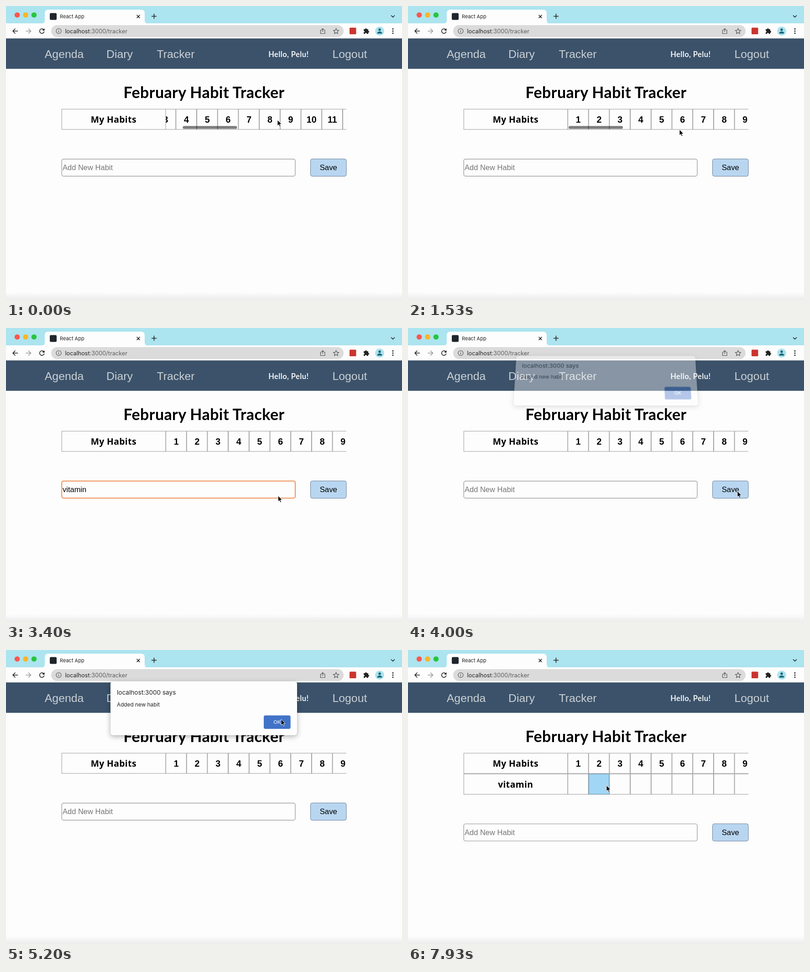
Write an HTML page that moves like this. It is 868 by 645 pixels and loops after 8000 ms.

```html
<!DOCTYPE html>
<html lang="en">
<head>
<meta charset="utf-8">
<title>Habit tracker</title>
<style>
  html, body { margin: 0; width: 100%; height: 100%; overflow: hidden; background: #fdfdfd; }
  #stage { position: absolute; left: 0; top: 0; width: 868px; height: 645px; overflow: hidden; }
  svg { position: absolute; left: 0; top: 0; display: block; }
  .ui { font-family: Inter, Roboto, sans-serif; }
  .arial { font-family: "Liberation Sans", Arial, sans-serif; }
  .lato { font-family: Lato, sans-serif; font-weight: 700; }
  .habit { font: 700 19.3px "Noto Sans", "Open Sans", sans-serif; letter-spacing: .4px; }
  .mid { text-anchor: middle; }
  .nav { font-size: 24.8px; fill: #cbd0d5; }
  .day { font-size: 19.5px; font-weight: 700; }
  .cell { fill: none; stroke: #9a9a9c; }
  .line { fill: none; stroke: #222; stroke-width: 1.6; stroke-linecap: round; stroke-linejoin: round; }
  #dialog {
    left: 229px; top: 69px; background: #fdfdfd; border-radius: 5px;
    box-shadow: 0 3px 12px rgba(0,0,0,.3), 0 0 1px rgba(0,0,0,.4);
  }
</style>
</head>
<body>
<div id="stage">
  <svg width="868" height="645" viewBox="0 0 868 645">
    <defs>
      <clipPath id="days"><rect x="350" y="220" width="396" height="105"/></clipPath>
      <linearGradient id="foot" x1="0" y1="0" x2="0" y2="1">
        <stop offset="0" stop-color="#fdfdfd"/><stop offset="1" stop-color="#ececec"/>
      </linearGradient>
    </defs>
    <rect width="868" height="645" fill="#fdfdfd"/>
    <rect y="627" width="868" height="18" fill="url(#foot)"/>

    <!-- tab strip -->
    <rect width="868" height="39" fill="#ace4ef"/>
    <circle cx="24.5" cy="19.7" r="5.8" fill="#fc5550"/>
    <circle cx="43" cy="19.7" r="5.8" fill="#fdb524"/>
    <circle cx="61.4" cy="19.7" r="5.8" fill="#27c53c"/>
    <path d="M77 39q8 0 8-8V16q0-8 8-8H296q8 0 8 8V31q0 8 8 8Z" fill="#fdfdfd"/>
    <rect x="96" y="15.5" width="15" height="15" rx="2.5" fill="#20252c"/>
    <text class="ui" x="118" y="27" font-size="11" fill="#222">React App</text>
    <path class="line" d="M287 20l6 6m0-6l-6 6M319.500 22.500h10m-5-5v10M844.500 21l3.500 3.500l3.500-3.500"/>

    <!-- toolbar -->
    <rect y="38" width="868" height="33.500" fill="#fdfdfd"/>
    <path class="line" d="M25.500 55H15m5-5l-5 5l5 5"/>
    <path class="line" d="M44 55h10.500m-5-5l5 5l-5 5" stroke="#999" style="stroke:#999"/>
    <path class="line" d="M83 52.500A5 5 0 1 0 83.500 56.500"/>
    <path d="M84.500 49v5h-5Z" fill="#222"/>
    <rect x="99" y="42" width="641" height="26" rx="13" fill="#dbdbdb"/>
    <g fill="none" stroke="#555" stroke-width="1.200">
      <circle cx="115.500" cy="55" r="5.500"/>
      <path d="M115.500 54v4m0-6.500v1.300"/>
      <path d="M692 53h-2.500v7.500h9.500V53h-2.500M694.200 57v-7.500m-2.500 2.500l2.500-2.500l2.500 2.500"/>
      <path d="M723.500 49.300l1.700 3.900 4.200.4-3.200 2.800 1 4.200-3.700-2.200-3.700 2.200 1-4.200-3.200-2.800 4.200-.4Z"/>
    </g>
    <text class="ui" x="129.500" y="59.500" font-size="12.700" fill="#222">localhost<tspan fill="#5c5c5c">:3000/tracker</tspan></text>
    <rect x="753" y="47.500" width="14.500" height="14.500" rx="1.500" fill="#c9352f"/>
    <path d="M784 51h3a2 2 0 1 1 4 0h3v3.500a2 2 0 1 1 0 4V61h-3.200a1.900 1.900 0 0 0-3.800 0H784v-3a1.900 1.900 0 0 0 0-3.800Z" fill="#222"/>
    <circle cx="819" cy="55" r="10" fill="#aee2ec"/>
    <circle cx="819" cy="52" r="2.700" fill="#17647a"/>
    <path d="M813.500 60.500q0-4.500 5.500-4.500t5.500 4.500Z" fill="#17647a"/>
    <g fill="#222"><circle cx="848" cy="50.300" r="1.500"/><circle cx="848" cy="55" r="1.500"/><circle cx="848" cy="59.700" r="1.500"/></g>

    <!-- navigation -->
    <rect y="71.500" width="868" height="66.300" fill="#3b526a"/>
    <rect y="71" width="868" height="1" fill="#5f6c78"/>
    <g class="arial nav">
      <text x="84.800" y="114">Agenda</text>
      <text x="220" y="114">Diary</text>
      <text x="330.500" y="114">Tracker</text>
      <text x="715.500" y="114">Logout</text>
    </g>
    <text class="lato mid" x="619.300" y="111.500" font-size="16.500" letter-spacing=".4" fill="#f2f4f6">Hello, Pelu!</text>

    <text class="lato mid" x="434" y="202" font-size="34" letter-spacing=".4">February Habit Tracker</text>

    <!-- table -->
    <g clip-path="url(#days)"><g id="strip"></g></g>
    <rect class="cell" x="122.300" y="226.300" width="227.700" height="44.500"/>
    <text class="habit mid" x="235.800" y="256">My Habits</text>
    <g id="row">
      <rect class="cell" x="122.300" y="272" width="227.700" height="44.500"/>
      <text class="habit mid" x="235.800" y="301.700">vitamin</text>
    </g>
    <rect id="thumb" y="263.300" width="119" height="6.200" rx="3.100"/>

    <!-- form -->
    <g id="form">
      <rect id="input" x="122.200" y="335.800" width="511.800" height="37.500" rx="4" fill="#fdfdfd"/>
      <text id="value" class="arial" x="124" y="360" font-size="16.500"></text>
      <rect x="667.500" y="335.500" width="78.500" height="38" rx="4" fill="#b9d6f1" stroke="#6a7f98"/>
      <text class="arial mid" x="706.800" y="360" font-size="16.800">Save</text>
    </g>
    <g id="menu">
      <rect x="121" y="375" width="177.500" height="82" rx="4" fill="#000" opacity=".12"/>
      <rect x="121.500" y="374" width="176" height="81.500" rx="3" fill="#fdfdfd" stroke="#dcdcdc" stroke-width=".8"/>
      <rect id="hover" x="122" y="382" width="175" height="33" fill="#ebebeb"/>
      <g class="ui" font-size="11.700" font-weight="500" fill="#222">
        <text x="133" y="402.500">vitamin</text>
        <text x="133" y="435.500">1h exercise</text>
      </g>
    </g>
  </svg>

  <svg id="dialog" width="409" height="118" viewBox="229 69 409 118">
    <g class="ui" fill="#222">
      <text x="243" y="98" font-size="13.600">localhost:3000 says</text>
      <text x="243" y="124" font-size="11.800">Added new habit</text>
    </g>
    <rect x="565" y="143.500" width="58.700" height="29.500" rx="3.500" fill="#4173c8"/>
    <text class="ui mid" x="594.300" y="162" font-size="11" font-weight="500" fill="#e6eefb">OK</text>
  </svg>

  <svg width="868" height="645" viewBox="0 0 868 645">
    <path id="cursor" d="M0 0V12.800L2.900 10.200L4.900 14.800L7 13.900L5 9.400H9Z" fill="#000" stroke="#fff" stroke-width=".9"/>
  </svg>
</div>
<script>
const LOOP = 8000, PITCH = 45.7, LEFT = 350.4;
const $ = id => document.getElementById(id);
const clamp = v => Math.max(0, Math.min(1, v));
const ramp = (t, a, b) => clamp((t - a) / (b - a));
const smooth = p => p * p * (3 - 2 * p);
const show = (id, on) => { $(id).style.display = on ? "" : "none"; };
const set = (id, attrs) => { for (const k in attrs) $(id).setAttribute(k, attrs[k]); };

// Day columns: header row, then the habit row
let header = "", boxes = "";
for (let i = 0; i < 28; i++) {
  const x = LEFT + PITCH * i;
  const box = (y, id) => `<rect ${id} class="cell" x="${x}" y="${y}" width="${PITCH - 0.8}" height="44.5"/>`;
  header += box(226.3, "") +
    `<text class="arial day mid" x="${x + 22.8}" y="255.500">${i + 1}</text>`;
  boxes += box(272, `id="box${i + 1}"`);
}
$("strip").innerHTML = header + `<g id="boxes">${boxes}</g>`;

// Pointer stops: time, x, y
const stops = [
  [0, 595, 250], [1100, 595, 250], [1500, 595, 271], [1620, 595, 271],
  [2080, 312, 356], [2250, 312, 356], [2530, 308, 403], [2800, 205, 399],
  [2980, 205, 399], [3600, 722, 358], [4200, 722, 358], [4900, 603, 152],
  [5350, 603, 152], [6130, 526, 261], [6780, 435, 297], [LOOP, 435, 297]
];

function pointer(t) {
  const i = stops.findIndex(s => s[0] > t);
  const [t0, x0, y0] = stops[i - 1], [t1, x1, y1] = stops[i];
  const p = smooth(ramp(t, t0, t1));
  return [x0 + (x1 - x0) * p, y0 + (y1 - y0) * p];
}

function drawDialog(t) {
  const open = ramp(t, 3930, 4110), shut = ramp(t, 5250, 5400);
  const alpha = open * (1 - shut), k = 1 - alpha;
  show("dialog", alpha > 0);
  $("dialog").style.opacity = alpha;
  $("dialog").style.transform = k
    ? `perspective(1117px) translateY(${-22 * k}px) scale(${1 - 0.043 * k}) rotateX(${30 * k}deg)`
    : "none";
}

function draw(t) {
  const scroll = 115 * Math.pow(1 - ramp(t, 0, 1000), 2);
  set("strip", { transform: `translate(${-scroll} 0)` });
  set("thumb", { x: 352 + scroll * 0.308, opacity: 0.5 * (1 - ramp(t, 1650, 1900)) });

  const added = t >= 5450;
  show("row", added);
  show("boxes", added);
  set("form", { transform: `translate(0 ${added ? 45.7 : 0})` });
  $("box2").style.fill = t >= 7400 ? "#a1d6f5" : "none";
  $("box2").style.stroke = t >= 7400 ? "#5f8298" : "";

  const focus = t >= 2100 && t < 3750;
  set("input", { stroke: focus ? "#ee9058" : "#929296", "stroke-width": focus ? 2 : 1.2 });
  const filled = t >= 2720 && t < 3930;
  $("value").textContent = filled ? "vitamin" : "Add New Habit";
  set("value", { fill: filled ? "#000" : "#757575" });
  show("menu", t >= 2180 && t < 2930);
  show("hover", t >= 2620);

  drawDialog(t);
  set("cursor", { transform: `translate(${pointer(t)})` });
}

const start = performance.now();
function tick() {
  draw((performance.now() - start) % LOOP);
  requestAnimationFrame(tick);
}
tick();
</script>
</body>
</html>
```
